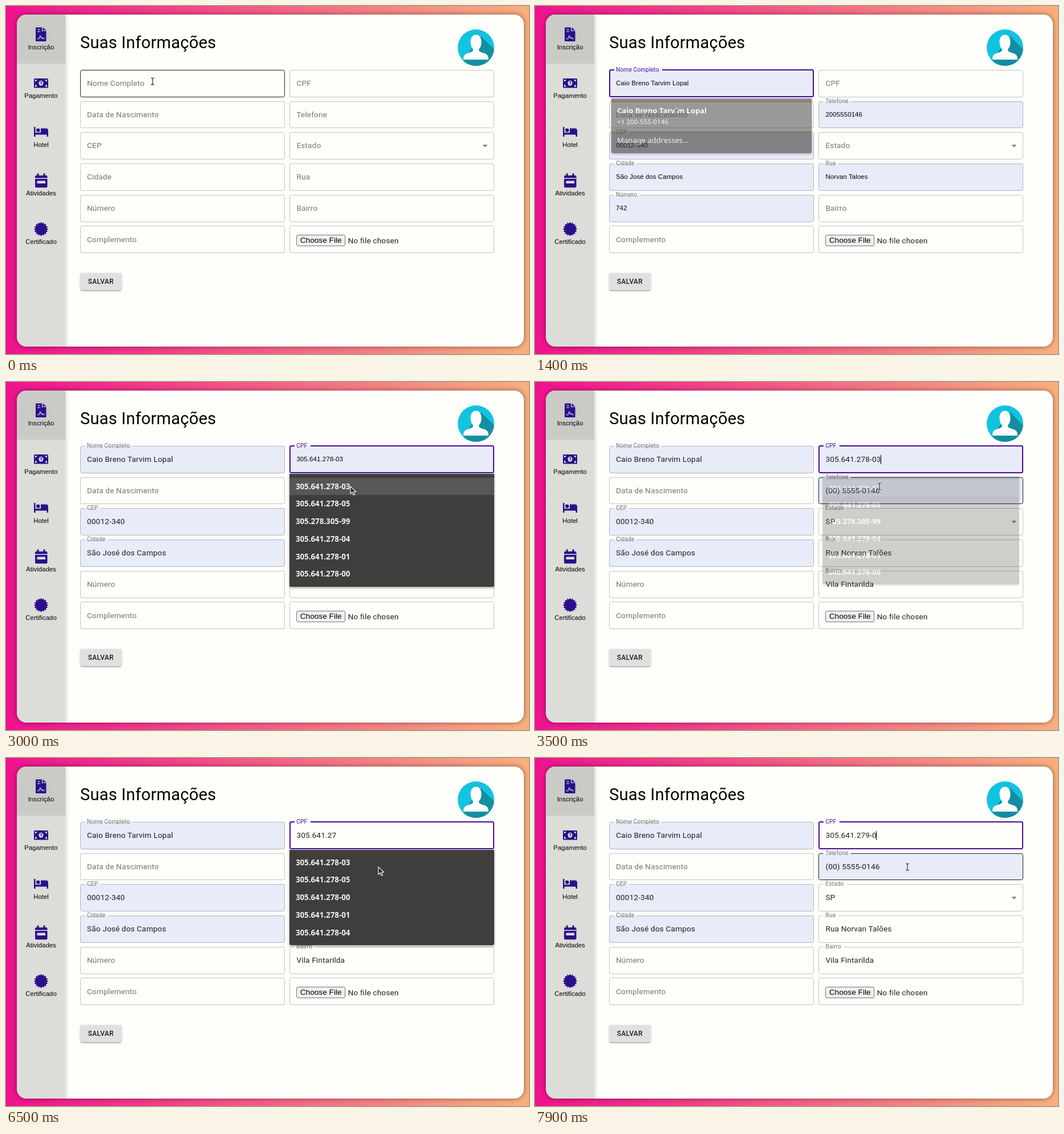
Write an HTML page that moves like this. It is 917x610 px and loops after 8 s.

```html
<!DOCTYPE html>
<html lang="pt-BR">
<head>
<meta charset="utf-8">
<title>Suas Informações</title>
<style>
  html, body { margin: 0; width: 100%; height: 100%; overflow: hidden; }
  #stage {
    position: relative; width: 917px; height: 610px; overflow: hidden;
    background: linear-gradient(to right, #f0118f, #f7b07e);
    font: 13.67px Roboto, sans-serif; color: rgba(0,0,0,.87); white-space: nowrap;
  }
  #stage * { box-sizing: border-box; }
  #panel {
    position: absolute; left: 19px; top: 15px; width: 889px; height: 582px;
    border-radius: 17px; background: #fefefb; overflow: hidden;
  }
  #shade { position: absolute; left: 19px; top: 15px; width: 889px; height: 582px; border-radius: 17px; box-shadow: 0 0 9px rgba(0,0,0,.45); }
  #side { position: absolute; inset: 0 auto 0 0; width: 85px; background: #dcddd9; box-shadow: 1px 0 7px rgba(0,0,0,.2); }
  #active { height: 86px; background: #cacac7; }
  .menu { position: absolute; left: 19px; width: 85px; text-align: center; font: 11.4px/14px "Liberation Sans", Arial, sans-serif; color: #000; }
  h1 { position: absolute; left: 130px; top: 44px; margin: 0; font: 400 29.05px/41px Roboto, sans-serif; letter-spacing: .00735em; color: #000; }
  svg { position: absolute; left: 0; top: 0; }

  .field { position: absolute; width: 359px; height: 47.8px; letter-spacing: .00938em; border-radius: 3.4px; }
  .field fieldset {
    position: absolute; inset: -4.27px 0 0; min-width: 0; margin: 0; padding: 0 6.8px;
    border: 1px solid rgba(0,0,0,.23); border-radius: 3.4px;
  }
  .field legend { height: 9.4px; padding: 0; overflow: hidden; font-size: 10.25px; line-height: 9.4px; visibility: hidden; }
  .field legend span { padding: 0 4.27px; }
  .label { position: absolute; left: 12px; top: 17.1px; line-height: 1; transform-origin: 0 0; color: rgba(0,0,0,.54); }
  .value { position: absolute; left: 12px; top: 0; line-height: 47.8px; }
  .preview .value { font-family: "Liberation Sans", Arial, sans-serif; font-size: 11.4px; color: #000; }
  .caret { display: inline-block; width: 1px; height: 16px; margin-left: -.5px; vertical-align: middle; background: #000; }
  .hover fieldset { border-color: rgba(0,0,0,.87); }
  .leaving fieldset { border-color: #7b78a6; }
  .leaving .label { color: #69598f; }
  .focus fieldset { border: 2px solid #460c98; }
  .focus .label, .tinted .label { color: #4a0f9b; }
  .disabled .value { color: rgba(0,0,0,.38); }

  .choose {
    position: absolute; left: 11.5px; top: 15.4px; width: 86.5px; height: 20px; text-align: center;
    font: 13.67px/18px "Liberation Sans", Arial, sans-serif; letter-spacing: 0; color: #000;
    background: #efefef; border: 1px solid #767676; border-radius: 3px;
  }
  .chosen { position: absolute; left: 102px; top: 15.4px; line-height: 20px; }
  #save {
    position: absolute; left: 130px; top: 467.5px; width: 72.6px; height: 30.8px; border-radius: 3.4px;
    text-align: center; font: 500 11.96px/30.8px Roboto, sans-serif; letter-spacing: .02857em;
    background: #e0e0e0;
    box-shadow: 0 3px 1px -2px rgba(0,0,0,.2), 0 2px 2px rgba(0,0,0,.14), 0 1px 5px rgba(0,0,0,.12);
  }
  #save.off { color: rgba(0,0,0,.26); background: rgba(0,0,0,.12); box-shadow: none; }

  .popup {
    position: absolute; top: 161px; width: 359px; padding: 6.5px 0; border-radius: 0 0 3px 3px;
    background: #3f3e3c; box-shadow: 0 2px 4px rgba(0,0,0,.35);
    font: 600 13.3px/30.75px "Noto Sans", "Open Sans", sans-serif; color: #f1f1ef;
  }
  .popup div { height: 30.75px; padding-left: 10.5px; }
  .popup.over div:first-child { background: #575855; }
  .popup .tall { height: 50px; }
  .popup .tall small { display: block; margin-top: -9px; font-size: 11.8px; font-weight: 400; line-height: 27px; }
  .popup .manage { height: 35px; padding-top: 2px; border-top: 1px solid #5a5a58; font-weight: 500; }
</style>
</head>
<body>
<div id="stage">
  <div id="shade"></div>
  <div id="panel"><div id="side"><div id="active"></div></div></div>
  <h1>Suas Informações</h1>
  <svg width="917" height="610">
    <g fill="#2a108a">
      <path d="M53.5 37.500h9.500v6.500h7.500v16.500a1.500 1.500 0 0 1-1.500 1.500h-15.500a1.500 1.500 0 0 1-1.500-1.500v-21.500a1.500 1.500 0 0 1 1.500-1.500zM64.500 37.500l6 5.200h-6z"/>
      <path d="M55 41.300h5M55 44.800h5M55 57.500l3-.3 2-5 2.300 4.300 1.500-1.300 1.400 2h3" fill="none" stroke="#d0d0cd" stroke-width="1.3"/>
      <rect x="49" y="127" width="25" height="16.500" rx="1.500"/>
      <g fill="#dcddd9">
        <path d="M51 129h3.300a3.300 3.300 0 0 1-3.300 3.300zM72 129v3.300a3.300 3.300 0 0 1-3.300-3.300zM51 141.500v-3.300a3.300 3.300 0 0 1 3.300 3.300zM72 141.500h-3.300a3.300 3.300 0 0 1 3.300-3.300z"/>
        <ellipse cx="61.500" cy="135.200" rx="4" ry="4.500"/>
      </g>
      <path d="M60.500 133.500l1.500-1v5" fill="none" stroke="#2a108a" stroke-width="1.3"/>
      <path d="M49 212h2.500v10h9.500v-7.500h9a4 4 0 0 1 4 4v10.500h-2.500v-3.500h-20v3.500h-2.500z"/>
      <circle cx="56.300" cy="217.800" r="3.200"/>
      <path d="M54.500 293.500h3v3.500h8v-3.500h3v3.500h2.500a1.500 1.500 0 0 1 1.500 1.500v3h-21.500v-3a1.500 1.500 0 0 1 1.500-1.500h2zM51 303h21.500v13.500a1.800 1.800 0 0 1-1.800 1.800h-17.900a1.800 1.800 0 0 1-1.800-1.800z"/>
      <path d="M54.500 306.500h14.500v4.500h-14.500z" fill="#dcddd9"/>
      <path id="seal"/>
    </g>
    <clipPath id="disc"><circle cx="824" cy="73" r="32"/></clipPath>
    <g clip-path="url(#disc)">
      <path d="M790 40h68v68h-68z" fill="#12c3e0"/>
      <path d="M833 53l30 30v30h-58l-3-19z" fill="#148ea2"/>
      <path d="M802 94c0-8 3-10 10-12 5-1.500 7-2.500 7-6-3-3-4.500-7-4.500-13 0-8 4-12.500 9.500-12.500s9.500 4.500 9.500 12.500c0 6-1.500 10-4.500 13 0 3.500 2 4.500 7 6 7 2 10 4 10 12z" fill="#fefefe"/>
    </g>
    <path d="M835.700 243.200h8.600l-4.300 4.300z" fill="#757575"/>
  </svg>
  <div id="form"></div>
  <div id="save">SALVAR</div>
  <div id="popups"></div>
  <svg width="917" height="610">
    <g id="beam" fill="none">
      <path d="M-3-6q3 0 3 2v8q0 2-3 2M3-6q-3 0-3 2M3 6q-3 0-3-2" stroke="#fff" stroke-width="2.600"/>
      <path d="M-3-6q3 0 3 2v8q0 2-3 2M3-6q-3 0-3 2M3 6q-3 0-3-2" stroke="#222" stroke-width="1.200"/>
    </g>
    <path id="arrow" d="M0 0v13l3-2.800 2.200 5 2.300-1-2.200-4.900h4.200z" fill="#222" stroke="#fff" stroke-width="1.100"/>
  </svg>
</div>
<script>
const LOOP = 8000, STEP = 100, ROW = 54.7;
const $ = id => document.getElementById(id);
const add = (parent, className, html = '') => {
  const el = document.createElement('div');
  el.className = className;
  el.innerHTML = html;
  return parent.appendChild(el);
};
const clamp = x => Math.min(1, Math.max(0, x));
const within = (t, ...ranges) => ranges.some(([a, b]) => t >= a && t < b);
const rise = (t, start) => 1 - (1 - clamp((t - start) / 200)) ** 1.75;
const latest = (t, steps) => steps.filter(s => s[0] <= t).pop();

// Static parts
['Inscrição', 'Pagamento', 'Hotel', 'Atividades', 'Certificado'].forEach((name, i) => {
  add($('stage'), 'menu', name).style.top = 64.7 + 85.4 * i + 'px';
});
$('seal').setAttribute('d', 'M' + Array.from({ length: 32 }, (_, i) => {
  const r = i % 2 ? 10 : 12.6, a = i * Math.PI / 16;
  return `${(61.5 + r * Math.cos(a)).toFixed(1)} ${(391 + r * Math.sin(a)).toFixed(1)}`;
}).join('L') + 'z');

const labels = {
  name: 'Nome Completo', cpf: 'CPF', birth: 'Data de Nascimento', phone: 'Telefone',
  cep: 'CEP', state: 'Estado', city: 'Cidade', street: 'Rua',
  number: 'Número', district: 'Bairro', extra: 'Complemento', file: ''
};
const fields = {};
Object.entries(labels).forEach(([key, text], i) => {
  const el = add($('form'), 'field',
    `<fieldset><legend><span>${text}</span></legend></fieldset><div class="label">${text}</div><div class="value"></div>`);
  el.style.left = (i % 2 ? 497.4 : 130) + 'px';
  el.style.top = 112 + ROW * Math.floor(i / 2) + 'px';
  const part = selector => el.querySelector(selector);
  fields[key] = { el, legend: part('legend'), label: part('.label'), value: part('.value') };
});
add(fields.file.el, 'choose', 'Choose File');
add(fields.file.el, 'chosen', 'No file chosen');

const PERSON = 'Caio Breno Tarvim Lopal', CPF = '305.641.278-';
const rows = list => list.map(s => `<div>${s}</div>`).join('');
const endings = (...ends) => ends.map(e => CPF + e);
const popups = [
  { x: 130, open: 400, close: 1300, over: [800, 1600],
    html: `<div class="tall">${PERSON}<small>+1 200-555-0146</small></div><div class="manage">Manage addresses…</div>` },
  { x: 497.4, open: 2100, close: 3312, over: [2900, 3600],
    html: rows([...endings('03', '05'), '305.278.305-99', ...endings('04', '01', '00')]) },
  { x: 497.4, open: 4400, close: 6860, over: [4500, 5400],
    html: rows(endings('03', '05', '00', '01', '04')) }
];
popups.forEach(p => {
  p.el = add($('popups'), 'popup', p.html);
  p.el.style.left = p.x + 'px';
});

// Time tables
const cpfSteps = [
  [0, ''], [3000, CPF + '03'], [4400, CPF + '0'], [4500, CPF + '03'], [5500, CPF + '0'], [5600, CPF],
  [5800, '305.641.27'], [6900, '305.641.279'], [7000, '305.641.279-'], [7900, '305.641.279-0']
];
const pointer = [
  [0, 257, 132], [500, 257, 132], [800, 248, 188], [1500, 248, 188], [2000, 578, 145],
  [2700, 578, 145], [3000, 604, 183], [3500, 604, 183], [3800, 653, 191], [LOOP, 653, 191]
];

function formState(t) {
  const filled = t >= 900, preview = within(t, [900, 1500]), loaded = t >= 1900;
  const auto = value => ({ value: filled ? value : '', up: rise(t, 900), auto: filled, preview });
  const fetched = value => ({ value: loaded ? value : '', up: rise(t, 1900) });
  const loading = within(t, [1600, 1900]);
  return {
    name: { ...auto(PERSON), up: rise(t, 400), focus: within(t, [400, 2000]), hover: t < 400,
      leaving: within(t, [2000, 2300]), caret: within(t, [400, 900]) },
    cpf: { value: latest(t, cpfSteps)[1], up: rise(t, 2000), focus: t >= 2200,
      hover: within(t, [1900, 2200]), tinted: within(t, [2000, 2200]),
      auto: within(t, [3000, 4400], [4500, 5400]), preview: within(t, [3000, 3300], [4500, 5400]),
      caret: within(t, [2100, 2600], [3300, 4000], [4400, 4500], [5400, 6500], [6900, LOOP]) },
    phone: { ...auto(t < 1500 ? '2005550146' : '(00) 5555-0146'), hover: within(t, [3400, 4400], [7100, LOOP]) },
    cep: auto('00012-340'),
    city: { ...auto('São José dos Campos'), disabled: loading },
    street: loaded ? { value: 'Rua Norvan Talões', up: 1 } : { ...auto('Norvan Taloes'), disabled: loading },
    number: t < 1600 ? auto('742') : { value: '', up: 1 - rise(t, 1600) },
    state: fetched('SP'),
    district: fetched('Vila Fintarilda')
  };
}

function drawField(f, s) {
  const up = s.up || 0;
  f.el.className = 'field ' + ['focus', 'hover', 'leaving', 'tinted', 'preview', 'disabled'].filter(c => s[c]).join(' ');
  f.el.style.background = s.auto ? '#e8ebf8' : 'none';
  f.legend.style.maxWidth = up > .8 ? 'none' : '0';
  f.label.style.transform = `translateY(${-22.2 * up}px) scale(${1 - .25 * up})`;
  const html = (s.value || '') + (s.caret ? '<i class="caret"></i>' : '');
  if (f.html !== html) f.value.innerHTML = f.html = html;
}

function drawPopup(p, t) {
  const alpha = t < p.open ? 0 : 1 - clamp((t - p.close) / 250);
  p.el.style.opacity = alpha;
  p.el.style.transform = `scale(${.947 + .053 * alpha})`;
  p.el.classList.toggle('over', within(t, p.over));
}

function drawPointer(t) {
  const i = pointer.findIndex(k => k[0] > t);
  const [t0, x0, y0] = pointer[i - 1], [t1, x1, y1] = pointer[i];
  const k = (t - t0) / (t1 - t0);
  const isArrow = within(t, [700, 1400], [2900, 3400], [4400, 7100]);
  for (const [id, shown] of [['arrow', isArrow], ['beam', !isArrow]]) {
    $(id).setAttribute('transform', `translate(${x0 + (x1 - x0) * k} ${y0 + (y1 - y0) * k})`);
    $(id).style.display = shown ? '' : 'none';
  }
}

function render(t) {
  const state = formState(t);
  for (const key in fields) drawField(fields[key], state[key] || {});
  popups.forEach(p => drawPopup(p, t));
  drawPointer(t);
  $('save').classList.toggle('off', within(t, [1600, 2000]));
}

const start = performance.now();
function tick() {
  const t = (performance.now() - start) % LOOP;
  render(Math.floor(t / STEP) * STEP);
  requestAnimationFrame(tick);
}
tick();
</script>
</body>
</html>
```
